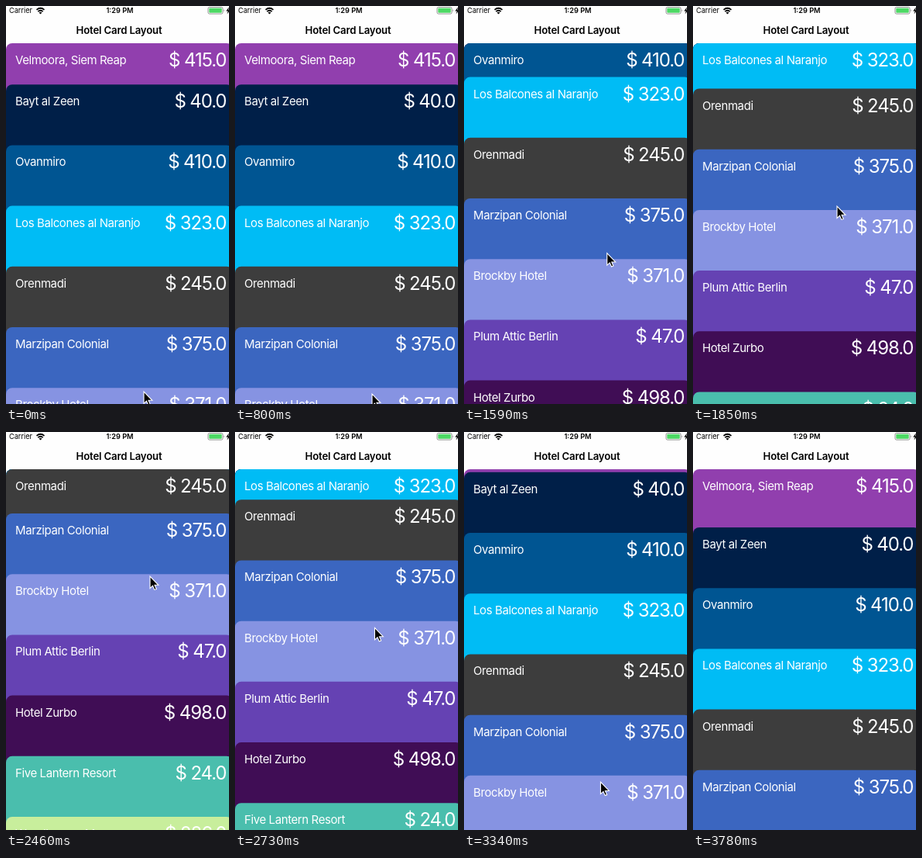
An HTML page that plays this animation: 288 by 513 pixels, repeating every 4850 ms.

```html
<!DOCTYPE html>
<html lang="en">
<head>
<meta charset="utf-8">
<title>Hotel Card Layout</title>
<style>
html, body { margin: 0; width: 100%; height: 100%; overflow: hidden; background: #fefefe; }
body { position: relative; font-family: Inter, Roboto, sans-serif; color: #000; }
body > *, .card > * { position: absolute; white-space: nowrap; }
.title { left: 0; top: 0; width: 292px; text-align: center; font: 600 13.2px/63px Inter, sans-serif; letter-spacing: -.18px; }
.carrier { left: 4px; top: 0; font-size: 9.2px; line-height: 12px; }
.clock { left: 0; top: 0; width: 294px; text-align: center; font: 600 9.2px/12px Inter, sans-serif; }
.icons, .cursor { left: 0; top: 0; overflow: visible; }
.card { left: 0; top: 0; width: 293px; height: 130px; border-radius: 8px; color: #fff; }
.name { left: 12px; top: 0; font-size: 15px; line-height: 44.6px; letter-spacing: -.4px; }
.price { right: 8.6px; top: 0; font-size: 24px; line-height: 43px; letter-spacing: -1.1px; }
</style>
</head>
<body>
<div class="carrier">Carrier</div>
<div class="clock">1:29 PM</div>
<div class="title">Hotel Card Layout</div>
<svg class="icons" width="288" height="14">
  <g fill="none" stroke="#000" stroke-width="1.7">
    <path d="M39.5 4.9Q44.5 .6 49.5 4.9M41.3 7.1Q44.5 4.4 47.7 7.1"/>
  </g>
  <path d="M42.5 8.4Q44.5 6.9 46.5 8.4L44.5 10.5Z"/>
  <rect x="261" y="1.5" width="19" height="8.6" rx="1.8" fill="none" stroke="#777" stroke-width=".8"/>
  <rect x="262.3" y="2.8" width="16.4" height="6" rx=".8" fill="#4cd964"/>
  <path d="M281.2 4.2q1.4 1.6 0 3.2z" fill="#777"/>
  <path d="M288 1.5L284.2 6.4H286.6L285.6 10.4L289.6 5.2H287.2Z"/>
</svg>
<svg class="cursor" width="14" height="20">
  <path d="M0 0V15.4L3.5 12.2 5.8 17.4 8.2 16.4 6 11.3H10.9Z" stroke="#fff" stroke-width="1.1"/>
</svg>
<script>
const LOOP = 4850, TOP = 48, GAP = 78.2, STEP = 87.65;

const hotels = [
  ['Velmoora, Siem Reap', 415, '#913fae'],
  ['Bayt al Zeen', 40, '#001f48'],
  ['Ovanmiro', 410, '#005592'],
  ['Los Balcones al Naranjo', 323, '#00bcf5'],
  ['Orenmadi', 245, '#3d3d3d'],
  ['Marzipan Colonial', 375, '#3b66c0'],
  ['Brockby Hotel', 371, '#8693e2'],
  ['Plum Attic Berlin', 47, '#6542b3'],
  ['Hotel Zurbo', 498, '#400d55'],
  ['Five Lantern Resort', 24, '#4abead'],
  ['Wendlemoor Manor', 286, '#c8ee9c']
];

// time, scroll offset, pointer x, pointer y
const keys = [
  [0, 25, 178, 497],
  [90, 25, 177.5, 499],
  [180, 25, 177, 500],
  [800, 25, 177, 500],
  [1330, 124.6, 182.6, 386],
  [1850, 254.3, 186, 258],
  [2380, 336, 186.5, 184],
  [2460, 334, 186, 186],
  [2990, 185.6, 176.4, 348],
  [3600, 16.2, 176.4, 521],
  [3780, 3.2, 176.4, 560]
];

const cursor = document.querySelector('.cursor');

function add(parent, cls, text) {
  const el = document.createElement('div');
  el.className = cls;
  el.textContent = text;
  return parent.appendChild(el);
}

const cards = hotels.map(([name, price, color]) => {
  const card = add(document.body, 'card', '');
  card.style.background = color;
  add(card, 'name', name);
  add(card, 'price', '$ ' + price.toFixed(1));
  return card;
});
document.body.append(cursor);

const secant = (i, c) => (keys[i + 1][c] - keys[i][c]) / (keys[i + 1][0] - keys[i][0]);

// Harmonic mean of neighbouring secants keeps the curve free of overshoot
function slope(i, c) {
  if (i === 0 || i === keys.length - 1) return 0;
  const a = secant(i - 1, c), b = secant(i, c);
  return a * b > 0 ? 2 * a * b / (a + b) : 0;
}

function valueAt(t, c) {
  const last = keys.length - 1;
  if (t >= keys[last][0]) return keys[last][c];
  const i = keys.findIndex(k => k[0] > t) - 1;
  const d = keys[i + 1][0] - keys[i][0], u = (t - keys[i][0]) / d, v = 1 - u;
  return v * v * (1 + 2 * u) * keys[i][c] + u * u * (3 - 2 * u) * keys[i + 1][c]
    + d * u * v * (v * slope(i, c) - u * slope(i + 1, c));
}

// The picture advances in steps of 80 or 90 ms
const tens = x => Math.floor(x / 10) * 10;
function snap(t) {
  if (t < 800) return Math.min(180, Math.floor(t / 90) * 90);
  const n = Math.ceil((tens(t - 800) + 5.5) / STEP) - 1;
  return 800 + tens(n * STEP + 4.5);
}

function draw() {
  const t = snap(performance.now() % LOOP);
  const scroll = valueAt(t, 1);
  cards.forEach((card, i) => {
    const y = TOP + Math.max(0, i * GAP - scroll);
    card.style.transform = `translateY(${y}px)`;
  });
  cursor.style.transform = `translate(${valueAt(t, 2)}px, ${valueAt(t, 3)}px)`;
  requestAnimationFrame(draw);
}
draw();
</script>
</body>
</html>
```
